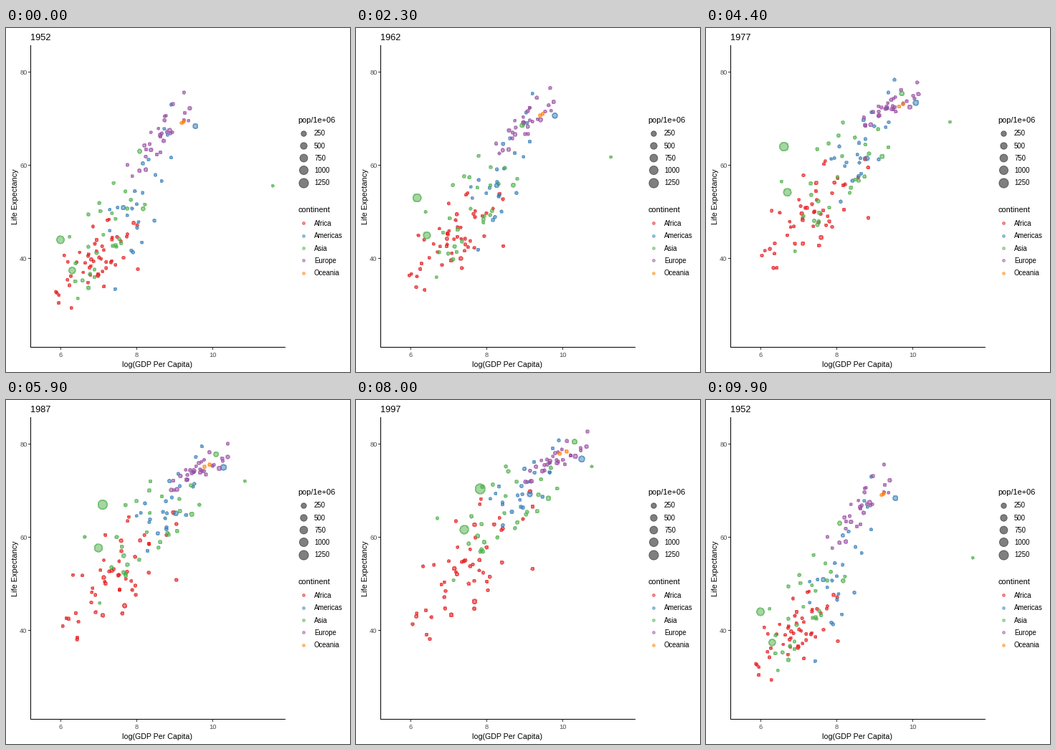
A matplotlib script that plays this animation: 480x480 px, repeating every 10 s.

```python
import numpy as np
import matplotlib.pyplot as plt
from matplotlib.animation import FuncAnimation

W = H = 480
DPI = 72
plt.rcParams["font.family"] = "Liberation Sans"

COLOURS = {"Africa": "#E41A1C", "Americas": "#377EB8", "Asia": "#4DAF4A",
           "Europe": "#984EA3", "Oceania": "#FF7F00"}
GROWTH = {"Africa": 0.026, "Americas": 0.014, "Asia": 0.016,
          "Europe": 0.006, "Oceania": 0.013}
YEARS = np.arange(1952, 2008, 5)
KEYS = (1952, 1977, 2007)
MAX_POP = 1319

rng = np.random.default_rng(12)
tracks = []  # (income, life, population, colour), one value per step


def add_country(continent, pop, incomes, lives):
    """Income follows a smooth curve through the key years, life straight lines."""
    curve = np.polyfit(np.subtract(KEYS, 1977), incomes, 2)
    x = np.polyval(curve, YEARS - 1977)
    y = np.interp(YEARS, KEYS, lives)
    tracks.append((x, y, pop * np.exp(GROWTH[continent] * (YEARS - 1977)),
                   COLOURS[continent]))


def normal():
    return np.clip(rng.normal(), -1.8, 1.8)


def add_crowd(continent, n, pop, x, sx, y, sy, link):
    """Scatter n countries around the means x, y with spreads sx, sy.

    link is the correlation between income and life expectancy.
    """
    x, sx, y, sy = map(np.array, (x, sx, y, sy))
    late = np.array((0, 0.6, 1))
    for _ in range(n):
        rank, health, drift = normal(), normal(), normal()
        u = rank + 0.35 * late * drift
        v = link * u + np.sqrt(1 - link ** 2) * (health + 0.3 * late * normal())
        size = min(pop * np.exp(normal()), 80)
        add_country(continent, size, x + sx * u, y + sy * v)


add_crowd("Africa", 50, 5, (6.95, 7.35, 7.5), (0.6, 0.75, 0.85),
          (39.5, 49.5, 54.8), (4.8, 6, 8.5), 0.45)
add_crowd("Americas", 23, 5, (8.1, 8.65, 9.0), (0.45, 0.45, 0.5),
          (53, 64.2, 73.3), (8.5, 6, 3.6), 0.75)
add_crowd("Asia", 28, 12, (7.15, 8.0, 8.5), (0.7, 0.95, 1.05),
          (46, 59, 69.8), (7.5, 8, 6.5), 0.75)
add_crowd("Europe", 29, 8, (8.5, 9.3, 9.8), (0.5, 0.45, 0.5),
          (64.5, 71.9, 77.5), (5, 2.3, 2.6), 0.85)
add_crowd("Oceania", 2, 7, (9.23, 9.75, 10.25), (0.03, 0.06, 0.12),
          (69.2, 72.9, 80.5), (0.2, 0.5, 0.6), 0.6)

# The few dots that stand out by size or place
add_country("Asia", 943, (5.99, 6.61, 8.51), (44, 64, 73))
add_country("Asia", 634, (6.30, 6.70, 7.80), (37.4, 54.2, 64.7))
add_country("Asia", 114, (8.08, 9.72, 10.36), (63, 75.4, 82.6))
add_country("Asia", 1, (11.59, 10.99, 10.76), (55.6, 69.3, 77.6))
add_country("Americas", 220, (9.55, 10.09, 10.67), (68.4, 73.4, 78.2))
add_country("Americas", 114, (7.65, 8.80, 9.11), (50.9, 61.5, 72.4))
add_country("Europe", 78, (8.87, 9.93, 10.38), (67.5, 72.5, 79.4))
add_country("Africa", 62, (6.98, 7.59, 7.61), (36.3, 44.5, 46.9))

income, life, people = (np.array([t[i] for t in tracks]) for i in range(3))


def px(v):
    return 76.5 + 52.9 * (v - 6)


def py(v):
    return 61.5 + 6.5 * (80 - v)


def area(size):
    """Marker area for a point size in millimetres."""
    return (0.75 * (2.845 * size + 0.945)) ** 2


def pop_size(pop):
    return 1 + 5 * np.sqrt(np.clip(pop / MAX_POP, 0, 1))


fig = plt.figure(figsize=(W / DPI, H / DPI), dpi=DPI, facecolor="white")
ax = fig.add_axes([0, 0, 1, 1])
ax.set(xlim=(0, W), ylim=(H, 0))
ax.axis("off")


def label(x, y, s, size=9.6, color="black", **kw):
    return ax.text(x, y, s, fontsize=size, color=color, **kw)


def line(xs, ys, color="black"):
    ax.plot(xs, ys, color=color, lw=1, solid_capstyle="butt", snap=False)


def dots(x, y, s, c):
    # Half-clear fill and rim overlap, which gives the darker edge
    return ax.scatter(x, y, s=s, c=c, alpha=0.5, linewidths=0.9, edgecolors=c,
                      antialiased=False, zorder=3)


line((34.5, 34.5), (24, 446))
line((34, 390), (445.5, 445.5))
for v in (6, 8, 10):
    tick = np.floor(px(v)) + 0.5
    line((tick, tick), (446, 449), "#333333")
    label(px(v), 459, v, 9.2, "#4D4D4D", ha="center")
for v in (40, 60, 80):
    line((31, 34), (py(v), py(v)), "#333333")
    label(29.5, py(v) + 3.2, v, 9.2, "#4D4D4D", ha="right")
label(211.5, 473, "log(GDP Per Capita)", 10.6, ha="center")
label(18, 235, "Life Expectancy", 10.9, rotation=90, ha="right", va="center")

label(407, 132, "pop/1e+06", 11)
for i, pop in enumerate((250, 500, 750, 1000, 1250)):
    y = 146.6 + 17.28 * i
    dots([415.3], [y], area(pop_size(pop)), "black")
    label(430, y + 3.7, pop)
label(407, 257, "continent", 11)
for i, (name, c) in enumerate(COLOURS.items()):
    y = 272.4 + 17.28 * i
    dots([415], [y], area(1.5), c)
    label(430, y + 3.7, name)

title = label(33.7, 17, "1952", 12.8)
cloud = dots(px(income[:, 0]), py(life[:, 0]), area(pop_size(people[:, 0])),
             [t[3] for t in tracks])

# First frame of each move between two steps
STARTS = (5, 14, 23, 32, 41, 49, 56, 64, 72, 80, 88, 96)


def state(frame):
    """Step before, step after and how far between them."""
    k = sum(s <= frame for s in STARTS)
    if k == 0:
        return 0, 0, 0.0
    first = STARTS[k - 1]
    moves = 3 if first == 49 else 4
    return k - 1, k % 12, min(1.0, (frame - first + 1) / moves)


def update(frame):
    a, b, t = state(frame)

    def mix(v):
        return v[:, a] * (1 - t) + v[:, b] * t

    cloud.set_offsets(np.column_stack((px(mix(income)), py(mix(life)))))
    cloud.set_sizes(area(mix(pop_size(people))))
    title.set_text(str(YEARS[b if t >= 0.5 else a]))
    return cloud, title


anim = FuncAnimation(fig, update, frames=100, interval=100, repeat=True, repeat_delay=0)
plt.show()
```
